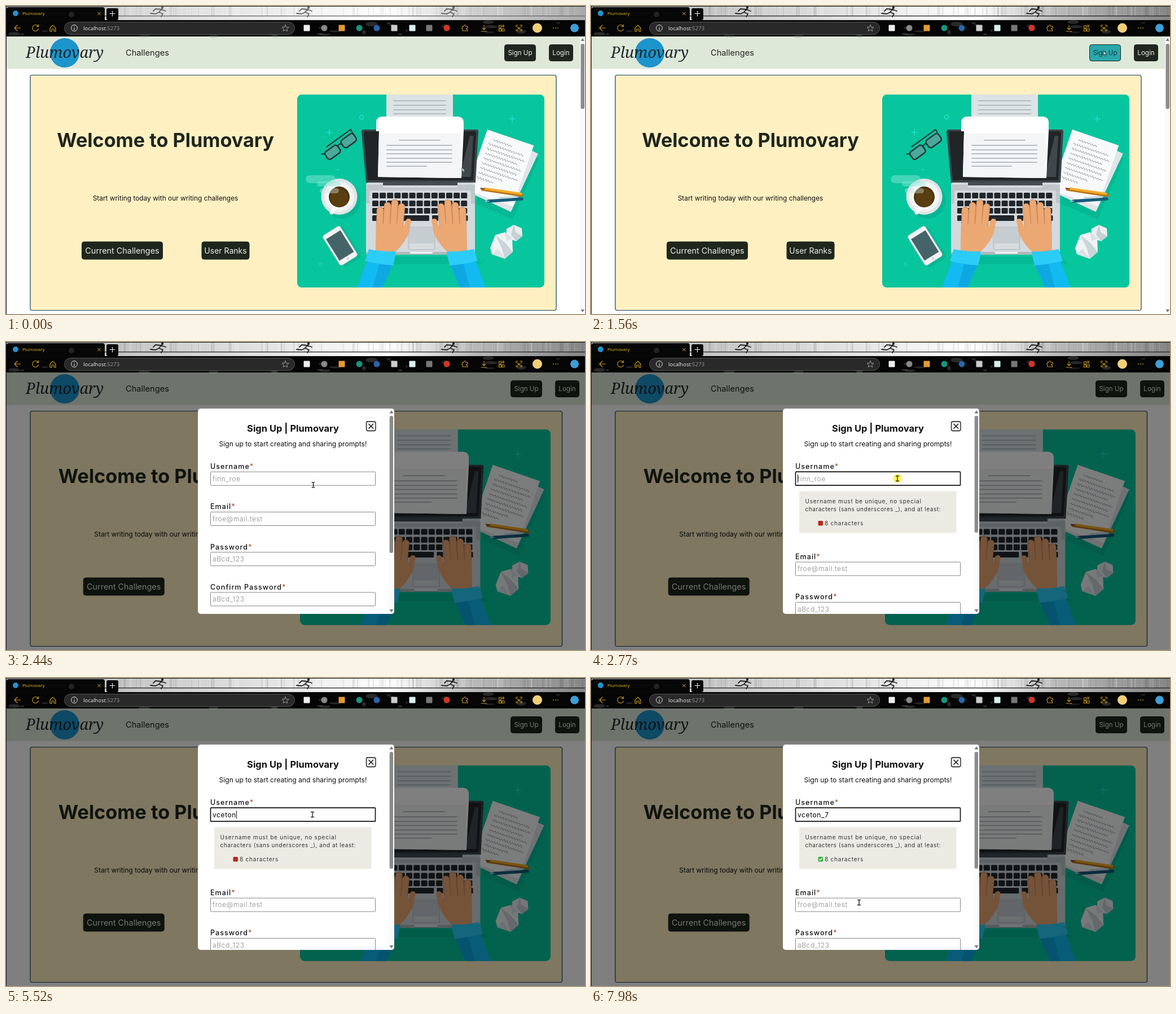
These frames come from a looping animation (1026x546 px, 8000 ms). An HTML page:

```html
<!DOCTYPE html>
<html lang="en">
<head>
<meta charset="utf-8">
<title>Plumovary</title>
<style>
  html, body { margin: 0; height: 100%; overflow: hidden; background: #fff; }
  svg { display: block; width: 100vw; height: 100vh; }
  text { font-family: Inter, sans-serif; white-space: pre; }
  .ui { font-family: "Open Sans", sans-serif; }
  .mid { text-anchor: middle; }
  .label { font-size: 12.5px; font-weight: 500; letter-spacing: 1.05px; }
  .field { font-size: 12px; font-weight: 300; letter-spacing: .6px; }
  .hint { font-size: 10px; letter-spacing: .8px; fill: #333; }
</style>
</head>
<body>
<svg id="stage" viewBox="0 0 1026 546"></svg>
<script>
const LOOP = 8000, OPEN = 1620, FOCUS = 2570, HINT = 2710;
const NAME = 'Plumovary', TYPED = 'vceton_7';
const KEYS = [3790, 4120, 4920, 5250, 5320, 5520, 6180, 7180];
const POINTER = [
  [0, 808, 286], [530, 808, 286], [1290, 908, 79], [1560, 908, 79], [1620, 910, 80],
  [1680, 910, 80], [2240, 545, 257], [2380, 545, 257], [2570, 543, 242],
  [7650, 543, 242], [7980, 475, 398]
];

let seed = 7;
const random = () => (seed = seed * 16807 % 2147483647) / 2147483647;
const repeat = (n, draw) => Array.from({ length: n }, (_, i) => draw(i)).join('');
const rect = (x, y, w, h, fill, more = '') =>
  `<rect x="${x}" y="${y}" width="${w}" height="${h}" fill="${fill}" ${more}/>`;
const circle = (x, y, r, fill, more = '') => `<circle cx="${x}" cy="${y}" r="${r}" fill="${fill}" ${more}/>`;
const path = (d, fill, more = '') => `<path d="${d}" fill="${fill}" ${more}/>`;
const line = (d, color, width, more = '') =>
  path(d, 'none', `stroke="${color}" stroke-width="${width}" stroke-linecap="round" ${more}`);
const text = (x, y, s, size, fill, more = '') =>
  `<text x="${x}" y="${y}" font-size="${size}" fill="${fill}" ${more}>${s}</text>`;
const button = (x, y, w, h, label, size, id = '') =>
  `<g ${id && `id="${id}"`}>` + rect(x, y, w, h, '#1f261d', 'rx="4" stroke="#1f261d"') +
  text(x + w / 2, y + h / 2 + size * .36, label, size, '#eaf2e4', 'class="mid"') + '</g>';

function browser() {
  const streaks = repeat(170, () =>
    rect(200 + random() * 826, 0, 1 + random() * 2, 17, random() > .5 ? '#fff' : '#555', 'opacity=".14"'));
  const smoke = repeat(34, () =>
    `<ellipse cx="${random() * 1026}" cy="${28 + random() * 26}" rx="${2 + random() * 9}" ry="${1 + random() * 3}" fill="#999" opacity=".25"/>`);
  const runner = x => `<g transform="translate(${x} 0)">` + circle(5, 3, 2.2, '#222') +
    line('M4 5L-1 11M3 6L11 9M2 6L-7 5L-11 9M-1 11L6 14L3 19M-1 11L-7 14L-16 13', '#222', 1.8) + '</g>';
  const gold = '#c99a22';
  const dots = [[533, '#eee', 1], [564, '#888'], [595, '#e39a35', 1], [626, '#15967f'], [657, '#2866a8'],
    [688, '#ccc', 1], [720, '#d9efec', 1], [750, '#777', 1], [781, '#d3352b']];
  return rect(0, 0, 1026, 26, 'url(#metal)') + streaks +
    rect(0, 17, 1026, 1.3, '#222') + [272, 531, 788].map(runner).join('') +
    line('M942 13H948M975 11H980V16H975ZM1007 10L1013 16M1013 10L1007 16', '#999', .8) +
    rect(200, 0, 826, 26, '#fff', 'id="faded" opacity=".3"') +
    rect(0, 25, 1026, 29, '#050505') + smoke + rect(0, 0, 1026, 1, '#111') + rect(0, 0, 1, 546, '#111') +
    rect(1, 2, 174, 26, '#070707', 'rx="4"') + circle(116, 15, 5, '#777', 'opacity=".25"') +
    circle(17, 13, 5, '#2493c9') + text(29, 16, NAME, 8, '#eab71c', 'class="ui"') +
    line('M162.5 11L167.5 16M167.5 11L162.5 16', '#ddb12c', 1) +
    rect(178, 4, 21, 21, '#080808', 'rx="3"') + line('M188.500 9V18M184 13.500H193', '#eee', 1.1) +
    rect(103.5, 28.5, 408, 22, '#292929', 'rx="11" stroke="#555"') +
    circle(121, 39, 5.5, 'none', 'stroke="#ddd"') + line('M121 38.500V42M121 36V36.200', '#ddd', 1.2) +
    text(137, 43, 'localhost<tspan fill="#999">:5273</tspan>', 9.5, '#eee', 'class="ui"') +
    line('M26 39H15M20 34L15 39L20 44M57 36A5.500 5.500 0 1 0 57.500 41M57.500 33V36.500H54M78 39L83 34L88 39V45H85V41H81V45H78Z', gold, 1.2) +
    line('M495 33.500L496.700 37.500L501 37.800L497.700 40.500L498.800 44.500L495 42.300L491.200 44.500L492.300 40.500L489 37.800L493.300 37.500Z', '#999', 1) +
    dots.map(([x, c, square]) => square ? rect(x - 5.5, 33.5, 11, 11, c, 'rx="1"') : circle(x, 39, 5.5, c)).join('') +
    line('M809 36H811Q813 31 815 36H818V39Q813 40 818 42V44H809V41Q806 39 809 38ZM847 34V42M844 39L847 42L850 39M842 45H852M873.500 35H877.500V39H873.500ZM873.500 40.500H877.500V44.500H873.500ZM879 40.500H883V44.500H879ZM881 33V38M878.500 35.500H883.500M904 37V34H907M911 34H914V37M914 41V44H911M907 44H904V41M906 37L912 42M912 37L906 42', gold, 1.1) +
    circle(941.5, 39, 8.5, '#f0cf7b') + [970, 974, 978].map(x => circle(x, 39, .9, gold)).join('') +
    circle(1007.5, 39, 7.5, '#3d9ed6');
}

function papers() {
  const scribbles = repeat(9, row => {
    let d = `M${row ? 10 : 16} ${14 + row * 9}`;
    const n = [7, 13, 14, 12, 14, 13, 14, 9, 6][row];
    for (let i = 0; i < n; i++) d += `q1.200 ${-2 - random() * 2} 2.500 0t2.500 0`;
    return line(d, '#888d92', .8);
  });
  const sheet = (x, y, turn, fill, inside = '') =>
    `<g transform="translate(${x} ${y}) rotate(${turn})">${rect(0, 0, 87, 114, fill)}${inside}</g>`;
  return path('M860 235L944 270L898 378L832 350Z', '#009b80', 'opacity=".35"') +
    sheet(864, 225, 25, '#dfe4e7') + sheet(853, 219, 19, '#f8f9fa', scribbles) +
    line('M844 325L915 336', '#b97318', 5) + line('M849 323.700L913 333', '#f2ab2a', 4) +
    line('M841 323L848 324', '#59412b', 1.5) +
    line('M855 346L914 342', '#155b78', 5.5) + line('M849 346.500L856 346M874 340L907 337.500', '#9fc4d2', 1.5);
}

function laptop() {
  const rows = [[331, 649, 13], [345, 649, 13], [358, 649, 13], [371, 649, 3], [371, 755, 5]];
  const keys = rows.map(([y, x, n]) => repeat(n, i => rect(x + i * 13.1, y, 11, 10, '#20262a', 'rx="1.5"'))).join('');
  const bars = (x, w, ys, c) => ys.map(y => line(`M${x} ${y}H${x + w}`, c, 2)).join('');
  return path('M640 444H831L846 458H650Z', '#009b80', 'opacity=".3"') +
    rect(674, 157, 118, 46, '#dce3e5') + bars(687, 92, [168, 176, 184, 191], '#b2bbc1') +
    path('M634 219H833Q838 219 837 224L832 313H638L630 224Q630 219 634 219Z', '#3e4448') +
    path('M637 222H830Q834 222 833 226L828 309H641L634 226Q634 222 637 222Z', '#202528') +
    path('M822 230L828 230L824 303H804Z', '#41484d') +
    rect(638, 313, 193, 128, '#d3d9dd', 'rx="4"') + path('M638 317H668V322H800V317H831V350H638Z', '#bfc6ca') +
    rect(668, 312, 132, 6, '#454d52') + rect(644, 327, 180, 59, '#d3d9dd', 'rx="3"') + keys +
    rect(689, 371, 61, 10, '#20262a', 'rx="1.5"') +
    rect(713, 392, 47, 40, '#c5cdd1', 'rx="2" stroke="#b5bdc2"') + rect(715, 421, 43, 10, '#d7dddf') +
    rect(638, 436, 193, 5, '#aeb7bb', 'rx="2"') + rect(716, 436, 40, 3, '#eef1f2') +
    path('M656 222V207Q656 196 668 196H799Q811 196 811 207V222L807 305L659 303L661 222Z', '#fff') +
    path('M661 226H806L806 305L659 303Z', '#f4f5f6') +
    bars(697, 72, [238], '#b9bec3') + bars(675, 115, [247, 255, 262, 270, 277], '#b9bec3') + bars(675, 70, [284], '#b9bec3');
}

function arm() {
  const skin = '#eba873';
  const fingers = 'M662 395L663 362M674 392L676 354M686 392L689 349M697 396L701 356';
  return path('M640 452L686 457L667 499H622Z', '#12baf2') + path('M662 455L686 457L667 499H650Z', '#0da8e2') +
    path('M656 386L700 386Q706 400 717 376L715 399Q709 418 690 436L655 432Z', skin) +
    line(fingers, '#cf8756', 12.5) + line(fingers, skin, 10.5) +
    line('M697 410Q708 402 713 382', skin, 10) + path('M656 386H703V412L690 436H655Z', skin) +
    path('M643 431Q666 436 690 435Q692 437 689 447L686 460Q660 458 636 452Z', '#2bccf8');
}

function desk() {
  const mint = '#25dfcf';
  const lens = x => rect(x, -8, 27, 16, '#4aa99b', 'rx="5" stroke="#2b3338" stroke-width="2.500"');
  return rect(516, 157, 438, 342, '#07c59d', 'rx="8"') +
    line('M568 224H578M573 219V229M892 200H902M897 195V205', mint, 1.5) +
    circle(630, 197, 3.5, 'none', `stroke="${mint}" stroke-width="1.500"`) + circle(557, 458, 2.5, 'none', `stroke="${mint}"`) +
    circle(588, 290, 1.5, mint) +
    `<g transform="translate(593 249) rotate(-36)">${lens(-31)}${lens(4)}${line('M-4 -3Q0 -6 4 -3M-31 -6L-35 -9M31 -6L32 -14L-20 -14', '#2b3338', 2)}</g>` +
    circle(596, 345, 32, '#009b80', 'opacity=".35"') + circle(590.5, 338, 32, '#dfe4e6') + circle(590.5, 338, 27, '#eff2f3') +
    line('M586 354L577 366', '#fff', 7) + circle(590.5, 338, 22, '#fff') + circle(590.5, 338.500, 18.5, '#4a320c') +
    circle(590.5, 340, 16, '#5a3d11') + rect(531, 300, 53, 14, '#8ce6d7', 'rx="7" opacity=".45"') +
    rect(551, 311, 42, 9, '#8ce6d7', 'rx="4.500" opacity=".45"') + rect(556, 323, 34, 9, '#d3e5df', 'rx="4.500" opacity=".4"') +
    `<g transform="translate(592 425) rotate(-32)">${rect(-14, -27, 36, 64, '#009b80', 'rx="4" opacity=".35"')}${rect(-18, -31, 36, 62, '#f1f4f5', 'rx="4" stroke="#cbd2d5"')}${rect(-15, -23, 30, 45, '#456469')}${circle(0, 26.500, 2, '#cbd2d5')}</g>` +
    path('M887 395L900 388L914 394L915 408L904 417L886 411Z', '#e9eef0') + path('M900 388L903 401L915 408L904 417L895 405Z', '#c5cfd4') +
    path('M858 429L867 406L884 401L897 412L898 436L884 448L861 440Z', '#eff3f4') +
    path('M867 406L884 419L898 436L884 448L878 428Z', '#cbd4d8') + path('M884 401L897 412L887 417ZM861 440L871 430L884 448Z', '#dbe2e5') +
    papers() + laptop() + arm() + `<g transform="translate(1472 0) scale(-1 1)">${arm()}</g>`;
}

function page() {
  const ink = '#1f261d';
  return rect(0, 54, 1026, 492, '#fff') + rect(0, 54, 1026, 57.5, '#dee8d9') +
    circle(104, 83, 26, '#1c94cc') + text(104, 92, NAME, 27, '#20272b', 'class="mid" style="font-family:\'Noto Serif\',serif;font-style:italic"') +
    text(212, 87.5, 'Challenges', 14.6, ink) +
    `<g id="account">${button(883.5, 68.5, 55, 29, 'Sign Up', 11.6, 'signup')}${button(962.5, 68.5, 42, 29, 'Login', 11.6)}</g>` +
    rect(43, 122.5, 932, 417, '#fff0c2', 'id="card" rx="3.500" stroke="#123f5b" stroke-width="1.200"') +
    `<g id="intro">${text(282.5, 250, 'Welcome to ' + NAME, 34.2, ink, 'class="mid" font-weight="700"')}` +
    text(282.5, 344.5, 'Start writing today with our writing challenges', 11.9, '#111', 'class="mid"') +
    button(134.5, 418, 143, 31, 'Current Challenges', 14.4) + button(347, 418, 84, 31, 'User Ranks', 14) + '</g>' +
    `<g id="desk">${desk()}</g>` +
    `<g id="pagebar">${rect(1017, 54, 9, 492, '#fafafa')}${rect(1018.5, 67, 6.5, 115.5, '#8b8b8b', 'rx="3"')}${path('M1018.500 62H1025L1021.700 57ZM1018.500 538H1025L1021.700 543Z', '#777')}</g>`;
}

function dialog() {
  const row = (y, label, hint, id = '') =>
    text(362, y + 4.5, label + '<tspan fill="#b5532a">*</tspan>', 12.5, '#111', 'class="label"') +
    rect(362.5, y + 9.7, 292, 24, '#fff', `${id && `id="${id}"`} stroke="#858585" rx="1"`) +
    text(366, y + 26, hint, 12, '#858585', `class="field" ${id && 'id="placeholder"'}`);
  return rect(0, 54, 1026, 492, '#000', 'opacity=".5"') + '<g clip-path="url(#sheet)">' +
    rect(340, 118, 348, 364, '#fff') +
    text(508.5, 158.5, `Sign Up | ${NAME}`, 16.5, '#111', 'class="mid" font-weight="700"') +
    text(508.5, 185, 'Sign up to start creating and sharing prompts!', 12.1, '#111', 'class="mid"') +
    rect(638.5, 141, 16.5, 16.5, '#f3f3f3', 'rx="3" stroke="#111" stroke-width="1.300"') +
    line('M643 145.500L650.500 153M650.500 145.500L643 153', '#111', 1.5) +
    row(220.5, 'Username', 'finn_roe', 'username') +
    '<text id="typed" x="366" y="246.500" class="field" style="font-weight:400"></text>' +
    rect(366, 235, 1, 14, '#111', 'id="caret"') +
    `<g id="hint">${rect(369, 264.5, 278.5, 74, '#ecebe3')}` +
    text(379.5, 285.5, 'Username must be unique, no special', 10, '#333', 'class="hint"') +
    text(379.5, 300, 'characters (sans underscores _), and at least:', 10, '#333', 'class="hint" style="letter-spacing:.55px"') +
    rect(402.5, 317, 8.5, 8.5, '#b92a1e', 'id="mark" rx="1.500"') +
    line('M404.500 321.200L406.200 323L409.200 319.300', '#fff', 1.2, 'id="tick"') +
    text(414, 325, '8 characters', 10, '#333', 'class="hint"') + '</g>' +
    `<g id="rest">${row(291.7, 'Email', 'froe@mail.test')}${row(363, 'Password', 'aBcd_123')}${row(434.2, 'Confirm Password', 'aBcd_123')}</g>` +
    rect(678, 118, 10, 364, '#fbfbfb') + rect(679.7, 131, 6.3, 243, '#8b8b8b', 'id="thumb" rx="3"') +
    path('M679.500 126.500H686.500L683 121.500ZM679.500 474H686.500L683 479Z', '#777') + '</g>';
}

const stage = document.getElementById('stage');
stage.innerHTML = `<defs>
  <linearGradient id="metal"><stop offset=".2" stop-color="#c4c4c4"/><stop offset=".45" stop-color="#e3e3e3"/>
    <stop offset=".66" stop-color="#fff"/><stop offset=".8" stop-color="#bbb"/><stop offset="1" stop-color="#858585"/></linearGradient>
  <clipPath id="sheet"><rect x="340" y="118" width="348" height="364" rx="5"/></clipPath></defs>` +
  page() + `<g id="dialog">${dialog()}</g>` + browser() +
  circle(543, 242, 7.8, '#fff35c', 'id="click" style="mix-blend-mode:multiply"') +
  `<g id="pointer">${path('M0 0V8.500L2 6.700L3.600 10L5 9.300L3.500 6.200H6.200Z', '#e9f2ee', 'id="arrow" fill-opacity=".75" stroke="#1b2b28" stroke-width=".8"')}` +
  line('M-2.500 -4.500H2.500M0 -4.500V4.500M-2.500 4.500H2.500', '#222', 1.4, 'id="beam"') + '</g>';

const el = {};
stage.querySelectorAll('[id]').forEach(node => el[node.id] = node);
const show = (node, on) => node.style.display = on ? '' : 'none';
const set = (node, values) => { for (const k in values) node.setAttribute(k, values[k]); };

function pointerAt(t) {
  const next = POINTER.findIndex(p => p[0] > t);
  if (next < 0) return POINTER.at(-1).slice(1);
  const [t0, x0, y0] = POINTER[next - 1], [t1, x1, y1] = POINTER[next];
  const u = (t - t0) / (t1 - t0), e = u * u * (3 - 2 * u);
  return [x0 + (x1 - x0) * e, y0 + (y1 - y0) * e];
}

function render(t) {
  const open = t >= OPEN, focused = t >= FOCUS, hinted = t >= HINT;
  const [x, y] = pointerAt(t);
  const count = KEYS.filter(k => k <= t).length;

  show(el.faded, t < 70);
  show(el.dialog, open);
  show(el.pagebar, !open);
  set(el.account, { transform: `translate(${open ? 11 : 0})` });
  set(el.intro, { transform: `translate(${open ? 2.7 : 0})` });
  set(el.card, { width: open ? 942.5 : 932 });
  set(el.desk, { transform: open ? 'translate(521 155) scale(1.0137) translate(-516 -157)' : '' });

  const hover = t < 1690 && x > 883 && x < 939 && y > 68 && y < 98;
  set(el.signup.firstChild, { fill: hover ? '#29a7ab' : '#1f261d' });
  set(el.signup.lastChild, { fill: hover ? '#1f3a39' : '#eaf2e4' });

  set(el.username, { stroke: focused ? '#111' : '#858585', 'stroke-width': focused ? 1.7 : 1 });
  show(el.placeholder, !count);
  el.typed.textContent = TYPED.slice(0, count);
  const since = t - (count ? KEYS[count - 1] : 2730);
  show(el.caret, hinted && since % 1060 < 530);
  if (open) set(el.caret, { x: 366 + (count ? el.typed.getComputedTextLength() : 0) });

  show(el.hint, hinted);
  set(el.rest, { transform: `translate(0 ${hinted ? 88.7 : 0})` });
  set(el.thumb, { height: hinted ? 207 : 243 });
  const valid = count === TYPED.length;
  set(el.mark, { fill: valid ? '#2fb53a' : '#b92a1e' });
  show(el.tick, valid);

  const overField = open && x > 362 && x < 655 && (y > 230 && y < 255 || hinted && y > 390 && y < 414);
  set(el.pointer, { transform: `translate(${x} ${y})` });
  show(el.arrow, !overField);
  show(el.beam, overField);
  show(el.click, t >= FOCUS && t < 2910);
}

function tick() {
  render(performance.now() % LOOP);
  requestAnimationFrame(tick);
}
tick();
</script>
</body>
</html>
```
